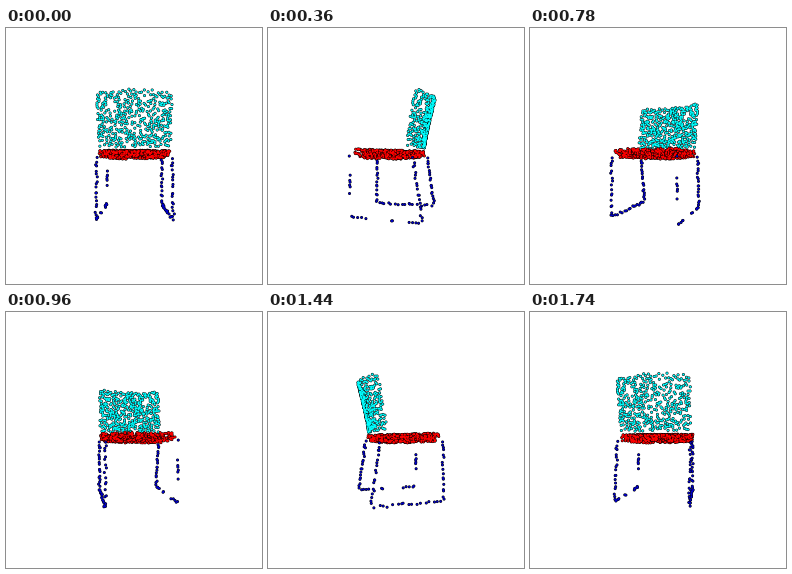
Recreate the animation shown at these times as a matplotlib script. Size 256x256 px, loop 1.8 s.

```python
import numpy as np
import matplotlib.pyplot as plt
from matplotlib.animation import FuncAnimation

SIZE, DPI = 256, 100
FRAMES, STEP = 30, 60
DIST, CX, HORIZON = 220, 128.5, 127.5
HALO = 9
CYAN, RED, BLUE, BLACK = (0, 1, 1), (1, 0, 0), (0, 0, 0.8), (0, 0, 0)

rng = np.random.default_rng(7)


def spread(n, gap):
    """Random points in [-1, 1] x [0, 1] that keep a small distance."""
    pts = []
    for _ in range(20000):
        p = rng.uniform((-1, 0), (1, 1))
        if all(np.hypot((p[0] - q[0]) * 33, (p[1] - q[1]) * 48) > gap for q in pts):
            pts.append(p)
            if len(pts) == n:
                break
    return np.array(pts).T


def backrest(n):
    u, v = spread(n, 1.3)
    bow = (8 + 3 * v) * u ** 2
    return np.column_stack([33.5 * u, 27 + 11 * v ** 1.2 - bow, 7.5 + 47.5 * v])


def seat(n):
    u, v = rng.uniform(-1, 1, (2, n))
    inside = u ** 6 + v ** 6 < 1.1
    u, v = u[inside], v[inside]
    a, b = 33 * u, -4.5 + 29.5 * v
    top = 5 - 0.037 * b
    bottom = -3.8 + 2.3 * np.maximum(u ** 2, v ** 2)
    drop = rng.random(len(u)) ** 1.2
    return np.column_stack([a, b, top + (bottom - top) * drop])


def rod(start, end, n, lo=0, hi=1):
    t = lo + (hi - lo) * (np.arange(n) + rng.uniform(0, 1, n)) / n
    line = np.outer(1 - t, start) + np.outer(t, end)
    return line + rng.normal(0, 0.45, (n, 3))


def legs():
    parts = []
    for side in (-1, 1):
        hip, heel = (33.5 * side, 25, -1), (33 * side, 33, -55)
        knee, toe = (31.5 * side, -34, 0), (31.5 * side, -35, -56)
        parts.append(rod(hip, heel, 19))
        if side > 0:
            parts += [rod(knee, toe, 17), rod(toe, heel, 17)]
        else:
            parts += [rod(knee, toe, 6, 0.32, 0.62), rod(knee, toe, 1, 0, 0.03),
                      rod(toe, heel, 5, 0, 0.28), rod(toe, heel, 2, 0.5, 0.7),
                      rod(toe, heel, 4, 0.8, 1)]
    return np.vstack(parts)


parts = [(backrest(400), CYAN), (seat(760), RED), (legs(), BLUE)]
cloud = np.vstack([p for p, _ in parts])
colors = np.vstack([np.tile(c, (len(p), 1)) for p, c in parts])
count = len(cloud)
all_colors = np.vstack([np.tile(BLACK, (count, 1)), colors])
sizes = np.repeat([(3.0 * 72 / DPI) ** 2, (2.0 * 72 / DPI) ** 2], count)

fig = plt.figure(figsize=(SIZE / DPI, SIZE / DPI), dpi=DPI, facecolor="white")
ax = fig.add_axes([0, 0, 1, 1])
ax.set(xlim=(0, SIZE), ylim=(SIZE, 0))
ax.axis("off")
dots = ax.scatter(np.zeros(2 * count), np.zeros(2 * count), s=sizes, c=all_colors,
                  linewidths=0, antialiased=True)


def draw(i):
    turn = 2 * np.pi * i / FRAMES
    a, b, h = cloud.T
    x = b * np.sin(turn) + a * np.cos(turn)
    z = b * np.cos(turn) - a * np.sin(turn)
    scale = DIST / (DIST - z)
    pos = np.column_stack([CX + x * scale, HORIZON - h * scale])
    # Halos sink a little, so only depth gaps and outlines turn black.
    order = np.argsort(np.concatenate([z - HALO, z]), kind="stable")
    dots.set_offsets(np.vstack([pos, pos])[order])
    dots.set_facecolors(all_colors[order])
    dots.set_sizes(sizes[order], DPI)
    return dots,


anim = FuncAnimation(fig, draw, frames=FRAMES, interval=STEP, repeat=True,
                     repeat_delay=0, blit=False)
plt.show()
```
